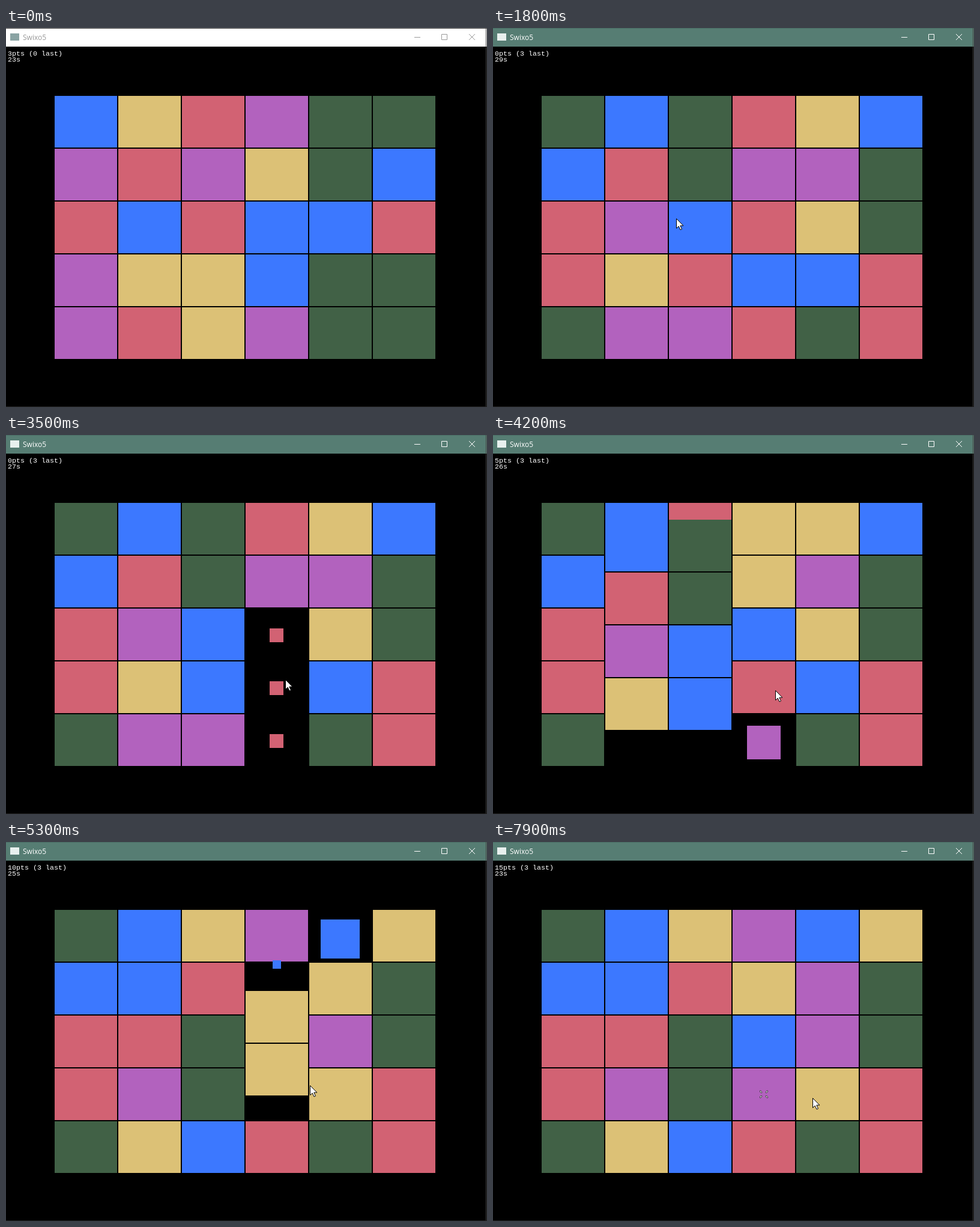
Write an HTML page with a canvas that moves like this. It is 801x631 px and loops after 8000 ms.

```html
<!DOCTYPE html>
<html lang="en">
<head>
<meta charset="utf-8">
<title>Swixo5</title>
<style>
  html, body { margin: 0; width: 801px; height: 631px; overflow: hidden; background: #000; }
  canvas { display: block; }
</style>
</head>
<body>
<canvas id="stage" width="801" height="631"></canvas>
<script>
const ctx = document.getElementById('stage').getContext('2d');
const LOOP = 8000, STEP = 100;
const PAUSES = [800, 2200, 4000, 6100];   // steps in which the picture stands still
const FOCUS = 300, RESET = 900;
const SHRINK = 400, MOVE = 310;

const COLORS = { B: '#3c78ff', Y: '#dcc176', R: '#d26273', P: '#b262be', G: '#416146' };
const OLD_BOARD = ['BYRPGG', 'PRPYGB', 'RBRBBR', 'PYYBGG', 'PRYPGG'];
const NEW_BOARD = ['GBGRYB', 'BRGPPG', 'RPBRYG', 'RYRBBR', 'GPPRGR'];
const SPAWNS = ['', 'B', 'RY', 'BYYBPPBYP', 'BB', 'Y'];   // per column, in order of arrival

// Cells are [column, row]; a swap exchanges the cell with its right neighbour.
const MOVES = [
  { at: 2678, swap: [2, 3] },
  { at: 2988, clear: [[3, 2], [3, 3], [3, 4]] },
  { at: 3400, clear: [[1, 4], [2, 4]] },
  { at: 3715, clear: [[3, 4]] },
  { at: 4123, clear: [[2, 3], [4, 3]] },
  { at: 4435, clear: [[3, 3]] },
  { at: 4540, clear: [[5, 0]] },
  { at: 4653, clear: [[3, 0]] },
  { at: 4850, clear: [[4, 0]] },
  { at: 5940, swap: [3, 1] },
  { at: 6250, clear: [[3, 1], [3, 2], [3, 3]] }
];
const SELECTIONS = [
  { from: 2100, to: 2678, cell: [3, 3] },
  { from: 5800, to: 5940, cell: [4, 1] },
  { from: 7300, to: 8000, cell: [3, 3] }
];
const POINTER = [   // time, x, y
  [200, 190, 610], [500, 240, 420], [1000, 292, 335], [1800, 305, 317],
  [2100, 439, 427], [2300, 442, 430], [2600, 375, 468], [2900, 358, 432],
  [3500, 465, 407], [4200, 470, 425], [4800, 476, 464], [5000, 478, 478],
  [5300, 506, 405], [5800, 554, 345], [6000, 538, 239], [6200, 538, 239],
  [6400, 468, 246], [6700, 471, 249], [7200, 460, 320], [7600, 462, 415],
  [7700, 464, 418], [7900, 532, 426]
];

const cellX = col => 81 + 106 * col;
const cellY = row => 113 + 88 * row;

function makeTile(color, col, row) {
  const x = cellX(col), y = cellY(row);
  return { color, x, y, fromX: x, fromY: y, movedAt: -MOVE, clearedAt: Infinity };
}

function tilePosition(tile, time) {
  const k = Math.min(1, (time - tile.movedAt) / MOVE);
  return [tile.fromX + (tile.x - tile.fromX) * k, tile.fromY + (tile.y - tile.fromY) * k];
}

function moveTile(tile, col, row, time) {
  [tile.fromX, tile.fromY] = tilePosition(tile, time);
  tile.x = cellX(col);
  tile.y = cellY(row);
  tile.movedAt = time;
}

function removeTile(columns, spawns, tile, time) {
  const col = columns.findIndex(c => c.includes(tile));
  const column = columns[col], gap = column.indexOf(tile);
  column.splice(gap, 1);
  column.unshift(makeTile(spawns[col].shift(), col, 0));
  for (let row = 1; row <= gap; row++) moveTile(column[row], col, row, time);
}

// Replays the game up to the given time.
function gameAt(time) {
  const board = time < RESET ? OLD_BOARD : NEW_BOARD;
  const columns = [...board[0]].map((_, col) =>
    board.map((line, row) => makeTile(line[col], col, row)));
  const spawns = SPAWNS.map(s => [...s]);
  const queue = [...MOVES];
  let score = 0;
  while (queue.length) {
    queue.sort((a, b) => a.at - b.at);
    const { at, swap, clear, dead } = queue.shift();
    if (at > time) break;
    if (swap) {
      const [col, row] = swap, left = columns[col], right = columns[col + 1];
      [left[row], right[row]] = [right[row], left[row]];
      moveTile(left[row], col, row, at);
      moveTile(right[row], col + 1, row, at);
    } else if (clear) {
      for (const [col, row] of clear) {
        const tile = columns[col][row];
        tile.clearedAt = at;
        queue.push({ at: at + SHRINK, dead: tile });
      }
    } else {
      removeTile(columns, spawns, dead, at);
      score++;
    }
  }
  return { columns, score };
}

function drawTile(tile, time) {
  const [x, y] = tilePosition(tile, time);
  ctx.fillStyle = COLORS[tile.color];
  if (time < tile.clearedAt) {
    ctx.fillRect(Math.round(x), Math.round(y), 104, 86);
    return;
  }
  const s = 1 - (time - tile.clearedAt) / SHRINK;
  const size = Math.round(104 * s);
  ctx.fillRect(Math.floor(x + 52 - 52 * s), Math.floor(y + 43 - 43 * s), size, size);
}

function drawSelection([col, row]) {
  const x = cellX(col) + 52, y = cellY(row) + 43;
  ctx.lineCap = 'round';
  for (const [color, width] of [['#222', 2.6], ['#fff', 1.1]]) {
    ctx.strokeStyle = color;
    ctx.lineWidth = width;
    ctx.beginPath();
    for (const sx of [-1, 1]) for (const sy of [-1, 1]) {
      ctx.moveTo(x + 5.8 * sx, y + 5 * sy);
      ctx.lineTo(x + 4 * sx, y + 3.2 * sy);
    }
    ctx.stroke();
  }
  ctx.lineCap = 'butt';
}

function drawTitleBar(active) {
  ctx.fillStyle = active ? '#567d73' : '#fff';
  ctx.fillRect(0, 0, 801, 31);
  ctx.fillStyle = active ? '#e8f0ee' : '#8aa3a3';
  ctx.fillRect(7, 9, 15, 12);
  ctx.fillStyle = ctx.strokeStyle = active ? '#fff' : '#999';
  ctx.font = '12px "Open Sans", sans-serif';
  ctx.fillText('Swixo5', 28, 20);
  ctx.lineWidth = 1;
  ctx.beginPath();
  ctx.moveTo(680, 15.5); ctx.lineTo(690, 15.5);
  ctx.rect(725.5, 10.5, 9, 9);
  ctx.moveTo(771, 10); ctx.lineTo(781, 20);
  ctx.moveTo(781, 10); ctx.lineTo(771, 20);
  ctx.stroke();
  ctx.fillStyle = active ? '#4a6e65' : '#3a3a3a';
  ctx.fillRect(0, 0, 801, 1);
  ctx.fillStyle = '#444';
  ctx.fillRect(799, 0, 1, 631);
  ctx.fillStyle = '#222';
  ctx.fillRect(0, 630, 801, 1);
}

function drawPointer(time) {
  if (time < POINTER[0][0]) return;
  let i = POINTER.findIndex(p => p[0] > time);
  if (i < 0) i = POINTER.length;
  const a = POINTER[i - 1], b = POINTER[i] || a;
  const k = a === b ? 0 : (time - a[0]) / (b[0] - a[0]);
  ctx.save();
  ctx.translate(Math.round(a[1] + (b[1] - a[1]) * k) + .5, Math.round(a[2] + (b[2] - a[2]) * k) + .5);
  const arrow = new Path2D('M0 0V16L3.7 12.6L6.5 18.5L9 17.4L6.3 11.6H11.4Z');
  ctx.fillStyle = '#fff';
  ctx.strokeStyle = '#000';
  ctx.lineWidth = 1;
  ctx.fill(arrow);
  ctx.stroke(arrow);
  ctx.restore();
}

function draw(clock) {
  let time = Math.floor(clock % LOOP / STEP) * STEP;
  const gameTime = time - STEP * PAUSES.filter(p => p <= time).length;
  if (PAUSES.includes(time)) time -= STEP;

  ctx.fillStyle = '#000';
  ctx.fillRect(0, 0, 801, 631);
  drawTitleBar(time >= FOCUS);

  const { columns, score } = gameAt(gameTime);
  const fresh = gameTime >= RESET;
  const seconds = fresh
    ? 29 - Math.floor((gameTime - RESET) / 1000)
    : 23 - Math.floor((gameTime + 500) / 1000);
  ctx.fillStyle = '#fff';
  ctx.font = '11.67px "Liberation Mono", monospace';
  ctx.fillText(fresh ? `${score}pts (3 last)` : '3pts (0 last)', 3, 46);
  ctx.fillText(`${seconds}s`, 3, 56);

  for (let row = 0; row < 5; row++)
    for (const column of columns) drawTile(column[row], gameTime);
  for (const s of SELECTIONS)
    if (gameTime >= s.from && gameTime < s.to) drawSelection(s.cell);
  drawPointer(time);
}

const start = performance.now();
function tick() {
  draw(performance.now() - start);
  requestAnimationFrame(tick);
}
tick();
</script>
</body>
</html>
```
